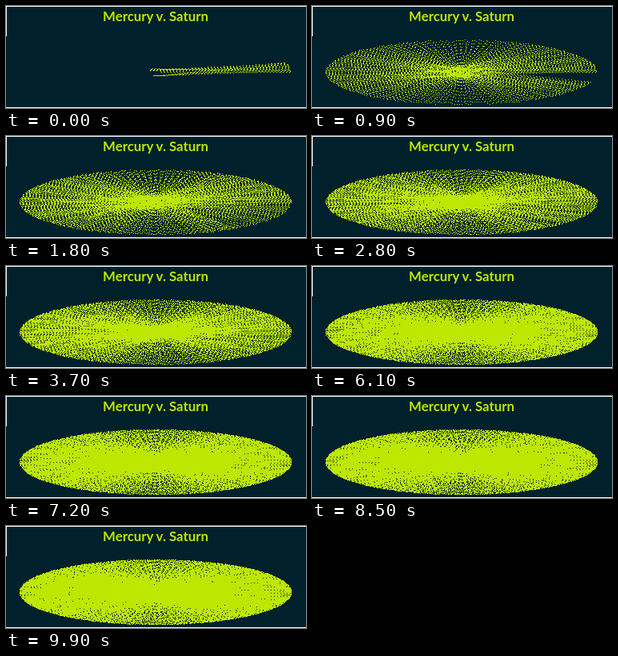
Animation, 375 px wide and 128 px high, one loop 10 s. Source, as an HTML page with a canvas:

```html
<!DOCTYPE html>
<html lang="en">
<head>
<meta charset="utf-8">
<title>Mercury v. Saturn</title>
<style>
  html, body { margin: 0; width: 100%; height: 100%; overflow: hidden; background: #00212b; }
  svg, canvas { position: absolute; left: 0; top: 0; }
  text { font: bold 16.8px Lato, sans-serif; fill: #bde600; text-anchor: middle; }
</style>
</head>
<body>
<canvas id="dance" width="375" height="128"></canvas>
<svg width="375" height="128">
  <path d="M0 0H375V1H1V38H0ZM0 127H375V128H0Z" fill="#fff"/>
  <text x="187" y="19">Mercury v. Saturn</text>
</svg>
<script>
const LIME = '#bde600';
const LOOP = 10000, STEP = 100;
const FIRST_LINES = 18, LINES_PER_STEP = 36, DAYS_PER_LINE = 30;
const DOT_GAP = 4;
const center = { x: 187, y: 83 };
const mercury = { period: 87.969, rx: 7, ry: 5 };
const saturn = { period: 10759.22, rx: 170, ry: 41 };

const ctx = document.getElementById('dance').getContext('2d');
let drawn = Infinity;

function position(planet, day) {
  const a = 2 * Math.PI * day / planet.period;
  return { x: center.x + planet.rx * Math.cos(a), y: center.y - planet.ry * Math.sin(a) };
}

// A dotted line joins both planets on the given day.
function drawLine(day) {
  const a = position(mercury, day), b = position(saturn, day);
  const dx = b.x - a.x, dy = b.y - a.y, length = Math.hypot(dx, dy);
  for (let d = 0; d <= length; d += DOT_GAP) {
    const t = d / length;
    ctx.fillRect(Math.floor(a.x + dx * t), Math.floor(a.y + dy * t), 1, 1);
  }
}

function render(time) {
  const step = Math.floor(time % LOOP / STEP);
  const total = FIRST_LINES + step * LINES_PER_STEP;
  if (total < drawn) {
    ctx.clearRect(0, 0, 375, 128);
    ctx.fillStyle = LIME;
    drawn = 0;
  }
  while (drawn < total) drawLine(DAYS_PER_LINE * drawn++);
}

const start = performance.now();
function tick() {
  render(performance.now() - start);
  requestAnimationFrame(tick);
}
tick();
</script>
</body>
</html>
```
